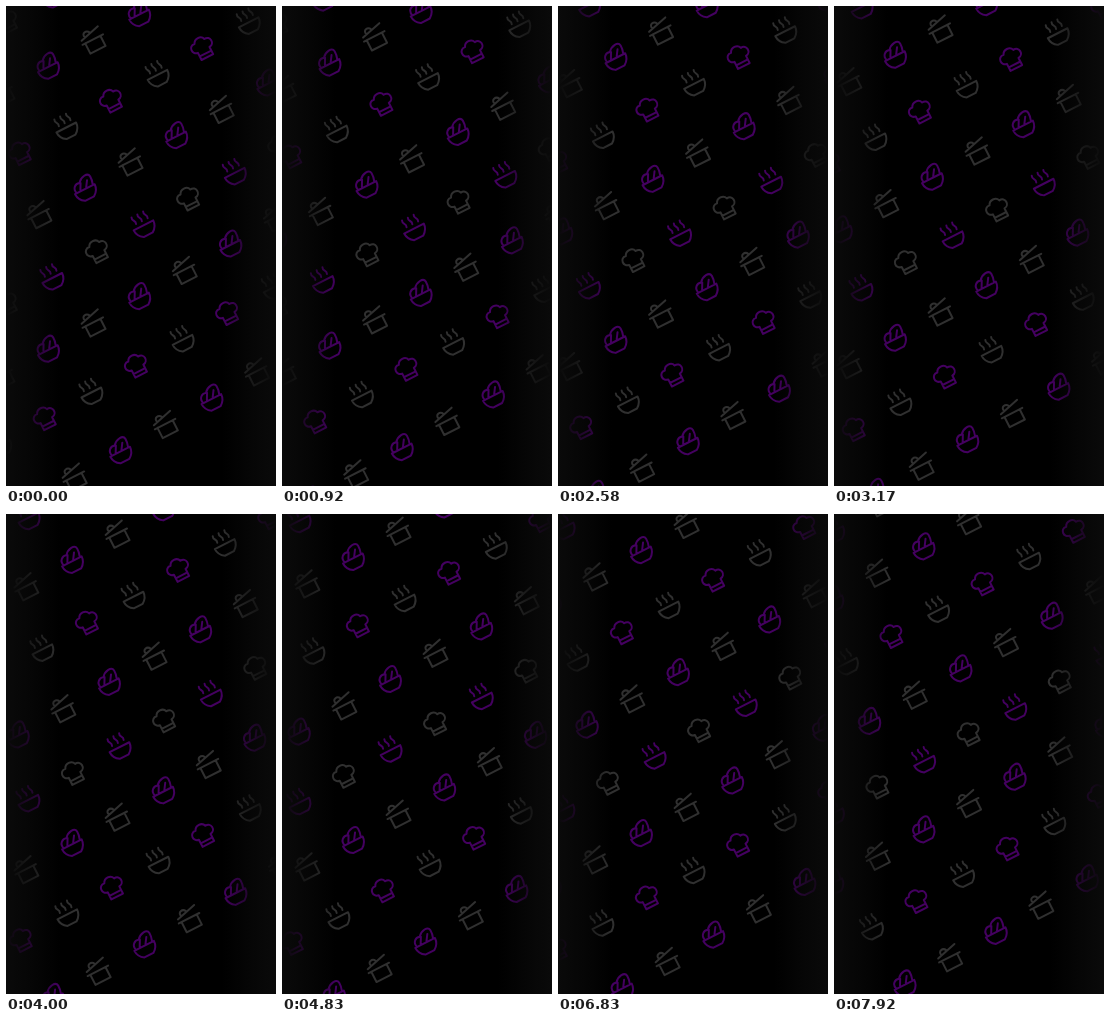
Animation of 270x480 px, one loop 8 s. Source, as an HTML page:

```html
<!DOCTYPE html>
<html lang="en">
<head>
<meta charset="utf-8">
<title>Kitchen pattern</title>
<style>
  html, body { margin: 0; width: 100%; height: 100%; overflow: hidden; background: #000; }
  svg { display: block; width: 100%; height: 100%; }
  use { fill: none; stroke-width: 2; stroke-linecap: round; stroke-linejoin: round; }
</style>
</head>
<body>
<svg viewBox="0 0 270 480" preserveAspectRatio="none">
  <defs>
    <path id="pot" d="M-11.5 -.5H11.5M-8.5 -.5V11H8.5V-.5M-10.5 -4.5L10.5 -10M-6 -6C-8 -11 -1.5 -12.5 .5 -8"/>
    <path id="salad" d="M-11 1H11C11 6 8 9.5 5 11.5H-5C-8 9.5 -11 6 -11 1ZM-9 1C-11 -5 -6 -8.5 -2 -7C2 -12 10 -13 10.5 -8C10.8 -5 10 -2 9 1M-4.5 0L-1 -6.5M2 0L6 -6"/>
    <path id="steam" d="M-11 1H11C11 6 8 9.5 5 11.5H-5C-8 9.5 -11 6 -11 1ZM-7 -11.5c-2 4 3 4 1 8M-.5 -11.5c-2 4 3 4 1 8M6 -11.5c-2 4 3 4 1 8"/>
    <path id="hat" d="M-6.5 10.5V2.5C-13 2 -12.5 -8 -5.5 -7C-3.5 -12 4 -12 5.5 -7C12.5 -8 13 2 6.5 2.5V10.5ZM-6.5 6.5H6.5"/>
    <linearGradient id="fade">
      <stop offset="0" stop-color="#0a0a0a"/>
      <stop offset=".1" stop-color="#0a0a0a" stop-opacity=".55"/>
      <stop offset=".2" stop-color="#0a0a0a" stop-opacity="0"/>
      <stop offset=".8" stop-color="#0a0a0a" stop-opacity="0"/>
      <stop offset=".9" stop-color="#0a0a0a" stop-opacity=".55"/>
      <stop offset="1" stop-color="#0a0a0a"/>
    </linearGradient>
  </defs>
  <g id="rising"></g>
  <g id="falling"></g>
  <rect width="270" height="480" fill="url(#fade)"/>
</svg>
<script>
  const GREY = '#303030', PURPLE = '#440060';
  const STEP = { x: 45.6, y: -26.3 };
  const SPEED = { x: 6, y: -3.46 };   // pixels per second
  const LOOP = 8000, FPS = 12;
  const rising = document.getElementById('rising');
  const falling = document.getElementById('falling');

  function addRow(layer, x, y, shapes, colors) {
    for (let k = -5; k <= 5; k++) {
      const icon = document.createElementNS('http://www.w3.org/2000/svg', 'use');
      const kind = Math.abs(k) % 2;
      icon.setAttribute('href', '#' + shapes[kind]);
      icon.setAttribute('stroke', colors[kind]);
      icon.setAttribute('transform',
        `translate(${x + STEP.x * k} ${y + STEP.y * k}) rotate(-27)`);
      layer.append(icon);
    }
  }

  for (const [x, y] of [[87, 34], [124, 156], [87, 317], [159.3, 418.5]])
    addRow(rising, x, y, ['pot', 'salad'], [GREY, PURPLE]);

  [[46, -11], [151, 68], [137, 218.5], [176, 333]].forEach(([x, y], i) =>
    addRow(falling, x, y, ['steam', 'hat'], i % 2 ? [GREY, PURPLE] : [PURPLE, GREY]));

  const start = performance.now();
  function draw(now) {
    const t = Math.max(0, now - start) % LOOP;
    // steps fall on whole hundredths of a second
    const frame = Math.floor((Math.floor(t / 10) * 10 + 5) * FPS / 1000);
    const dx = SPEED.x * frame / FPS, dy = SPEED.y * frame / FPS;
    rising.setAttribute('transform', `translate(${dx} ${dy})`);
    falling.setAttribute('transform', `translate(${-dx} ${-dy})`);
    requestAnimationFrame(draw);
  }
  draw(start);
</script>
</body>
</html>
```
